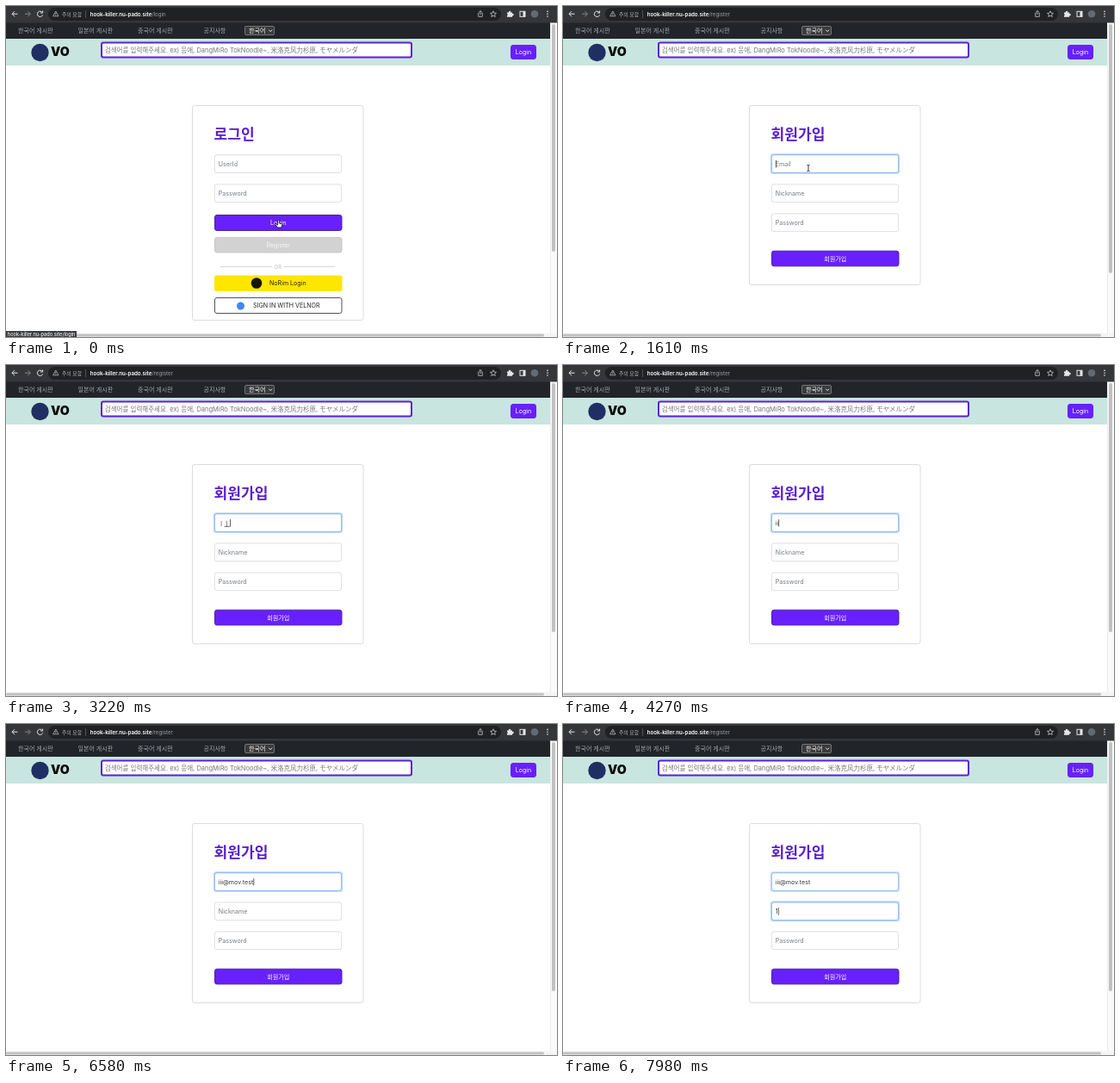
Animation of 640x384 px, one loop 8000 ms. Source, as an HTML page:

```html
<!DOCTYPE html>
<html lang="ko">
<head>
<meta charset="utf-8">
<title>회원가입</title>
<style>
  html, body { margin: 0; width: 100%; height: 100%; overflow: hidden; background: #fff; }
  svg { display: block; width: 640px; height: 384px; }
  text { font-family: Inter, "Noto Sans CJK KR", "Noto Sans CJK", "Noto Sans CJK JP", sans-serif; white-space: pre; }
</style>
</head>
<body>
<svg id="stage" viewBox="0 0 640 384" xmlns="http://www.w3.org/2000/svg"></svg>
<script>
const LOOP = 8000;
const PURPLE = '#6820ff', EDGE = '#4a21a8', MUTED = '#757b82';
const stage = document.getElementById('stage');

function add(parent, tag, attrs, content) {
  const el = document.createElementNS(stage.namespaceURI, tag);
  for (const k in attrs) el.setAttribute(k, attrs[k]);
  if (content !== undefined) el.textContent = content;
  parent.appendChild(el);
  return el;
}
const group = (parent = stage) => add(parent, 'g', {});
const rect = (p, x, y, width, height, fill, more) =>
  add(p, 'rect', { x, y, width, height, fill, ...more });
const circle = (p, cx, cy, r, fill) => add(p, 'circle', { cx, cy, r, fill });
const label = (p, x, y, str, size, fill, more) =>
  add(p, 'text', { x, y, 'font-size': size, fill, ...more }, str);
const line = (p, d, stroke, width = 1, more) =>
  add(p, 'path', { d, stroke, 'stroke-width': width, fill: 'none', ...more });
const show = (el, on) => el.setAttribute('visibility', on ? 'inherit' : 'hidden');
const MIDDLE = { 'text-anchor': 'middle' };

function button(p, x, y, w, h, str, fill, edge, color = '#fff') {
  rect(p, x + .5, y + .5, w - 1, h - 1, fill, { rx: 2.5, stroke: edge });
  label(p, x + w / 2, y + h / 2 + 2.6, str, 7.1, color, MIDDLE);
}

function field(p, y, hint) {
  const ring = group(p);
  rect(ring, 240.7, y - 1.3, 150.6, 24.1, '#c5dcfb', { rx: 3.6 });
  rect(p, 242.4, y + .4, 147.2, 20.7, '#fff', { rx: 2.5, stroke: '#d3d7dc', 'stroke-width': .8 });
  const focus = rect(p, 242.4, y + .4, 147.2, 20.7, 'none', { rx: 2.5, stroke: '#86b4f4', 'stroke-width': .9 });
  const text = label(p, 246.8, y + 13.6, '', 7.1, '#33383d');
  const under = rect(p, 0, y + 14.6, 6, .8, '#33383d');
  const caret = rect(p, 0, y + 6.6, .7, 8.6, '#222');
  return {
    set({ value = '', composing = false, glow = 0, caretOn = false }) {
      ring.setAttribute('opacity', glow);
      focus.setAttribute('opacity', glow);
      text.textContent = value || hint;
      text.setAttribute('fill', value ? '#33383d' : MUTED);
      const end = 246.8 + (value ? text.getComputedTextLength() : 0);
      caret.setAttribute('x', end + .2);
      under.setAttribute('x', end - 6.2);
      show(caret, caretOn);
      show(under, composing);
    }
  };
}

// Browser toolbar
rect(stage, 0, 0, 640, 20, '#35363a');
rect(stage, 49, 2, 526, 15, '#202124', { rx: 7.5 });
line(stage, 'M13.5 9.2H7.2M10 6.2 7 9.2 10 12.2', '#e4e6e9');
line(stage, 'M22 9.2H28.2M25.4 6.2 28.4 9.2 25.4 12.2', '#85888c');
line(stage, 'M42.3 7.6A3.2 3.2 0 1 0 42.6 10.4M42.6 5.6V8H40.1', '#e4e6e9');
line(stage, 'M57.8 6 61 11.8H54.6ZM57.8 8V9.8M57.8 10.3V11', '#b4b7bb', .8);
label(stage, 65, 11.5, '주의 요함', 5.8, '#b4b7bb');
rect(stage, 92, 5, .7, 9, '#65686c');
const url = label(stage, 97.8, 11.5, '', 6.2, '#9aa0a6');
add(url, 'tspan', { fill: '#fff', 'font-weight': 600 }, 'hook-killer.nu-pado.site');
const path = add(url, 'tspan', {}, '');
line(stage, 'M549.7 8H548.7V12.3H553.3V8H552.3M551 10V5.5M549.5 7 551 5.5 552.5 7', '#c4c7ca', .8);
line(stage, 'M566 5.8 567 8.2 569.5 8.4 567.6 10 568.2 12.5 566 11.2 563.8 12.5 564.4 10 562.5 8.4 565 8.2Z', '#c4c7ca', .8);
add(stage, 'path', { d: 'M582 7.4H584A1.2 1.2 0 1 1 586.2 7.4H588V9A1.2 1.2 0 1 1 588 11.2V12.8H582V11.2A1.2 1.2 0 0 0 582 9Z', fill: '#e4e6e9' });
rect(stage, 597, 6.3, 6, 6, 'none', { stroke: '#e4e6e9' });
rect(stage, 600.5, 6.3, 2.5, 6, '#e4e6e9');
circle(stage, 614, 9.3, 4.3, '#626a73');
for (const y of [6.4, 9.2, 12]) circle(stage, 629, y, .8, '#e4e6e9');

// Site header
rect(stage, 0, 19.5, 632, 18.5, '#212529');
[[14, '한국어 게시판'], [83.5, '일본어 게시판'], [153, '중국어 게시판'], [229.5, '공지사항']]
  .forEach(([x, s]) => label(stage, x, 31.3, s, 7, '#a3a7ab'));
rect(stage, 277.5, 23.5, 34, 10, '#3b3b3c', { rx: 1.5, stroke: '#86888a', 'stroke-width': .8 });
label(stage, 282, 31.2, '한국어', 7, '#fff');
line(stage, 'M305.3 27.7 307.2 29.6 309.1 27.7', '#fff', .9);
rect(stage, 0, 38, 632, 31, '#c9e5df');
circle(stage, 39.5, 54, 10.2, '#1f2f63');
label(stage, 52, 58.3, 'VO', 14.2, '#090909', { 'font-weight': 900 });
rect(stage, 111, 42.5, 360, 17, '#fff', { rx: 2, stroke: '#5a20d6', 'stroke-width': 2 });
label(stage, 114.8, 53.7, '검색어를 입력해주세요. ex) 응애, DangMiRo TokNoodle~, 米洛克风力杉原, モヤメルンダ', 7.5, '#777');
button(stage, 586, 45, 30, 17, 'Login', PURPLE, PURPLE);

// Scrollbars
rect(stage, 632, 19.5, 8, 364.5, '#fafafa');
rect(stage, 632, 19.5, .7, 364.5, '#e6e6e6');
const thumb = rect(stage, 634, 21, 4, 264, '#c1c1c1', { rx: 2 });
rect(stage, 0, 379.5, 640, 4.5, '#f4f4f4');
rect(stage, 0, 380.5, 625, 3, '#c1c1c1', { rx: 1.5 });

function card(height, title) {
  const g = group();
  rect(g, 216.5, 115.5, 198.5, height, '#fff', { rx: 2.5, stroke: '#dcdcdc' });
  label(g, 241.5, 155, title, 17.1, '#591fd0', { 'font-weight': 700 });
  return g;
}

// Login form
const login = card(249, '로그인');
field(login, 172.3, 'UserId').set({});
field(login, 206.5, 'Password').set({});
button(login, 242, 242, 148.5, 19, 'Login', PURPLE, EDGE);
button(login, 242, 268, 148.5, 18.5, 'Register', '#d2d2d2', '#c8c8c8', '#f6f6f6');
rect(login, 249, 302, 60, .8, '#d0d0d0');
rect(login, 322.5, 302, 60, .8, '#d0d0d0');
label(login, 315.8, 304.8, 'OR', 6, '#bdbdbd', MIDDLE);
rect(login, 242, 312.5, 148.5, 18.5, '#ffe600', { rx: 2.5 });
circle(login, 291, 321.5, 6.3, '#17150a');
label(login, 306, 324.2, 'NoRim Login', 7.1, '#29260c');
rect(login, 242.5, 338.5, 147.5, 18, '#fff', { rx: 2.5, stroke: '#3c4046', 'stroke-width': .9 });
circle(login, 272.5, 348, 4.5, '#4285f4');
label(login, 287, 349.6, 'SIGN IN WITH VELNOR', 7.1, '#212529');

// Sign-up form
const signup = card(208, '회원가입');
const email = field(signup, 172.3, 'Email');
const nick = field(signup, 206.5, 'Nickname');
field(signup, 240.5, 'Password').set({});
button(signup, 242, 283.7, 148.5, 18.6, '회원가입', PURPLE, EDGE);

// Link preview in the corner
const status = group();
const statusBox = rect(status, 0, 377, 82, 7, '#3a3b3f');
const statusText = label(status, 1.8, 382.6, '', 5.6, '#f1f1f1', { 'font-weight': 500 });

// Mouse pointers, drawn with the hot spot at 0,0
const mouse = group();
const pointers = {
  hand: add(mouse, 'path', {
    d: 'M-.9-3.2Q0-4.2.9-3.2V0L3.8.8Q4.6 1.1 4.4 2L3.6 5H-1.2L-3.4 1.8Q-3.2.6-2.2 1.1L-.9 2.2Z',
    fill: '#fff', stroke: '#111', 'stroke-width': .9
  }),
  arrow: add(mouse, 'path', {
    d: 'M0 0V6.2L1.4 5 2.4 7.2 3.5 6.7 2.5 4.6H4.3Z',
    fill: '#111', stroke: '#fff', 'stroke-width': .5
  }),
  beam: line(mouse, 'M-1.6-3.6Q0-3.6 0-2.6Q0-3.6 1.6-3.6M0-2.6V2.8M-1.6 3.8Q0 3.8 0 2.8Q0 3.8 1.6 3.8', '#222', .9)
};

// [time, x, y]
const route = [[70, 316.5, 252], [350, 312, 274], [600, 311.5, 273.5], [1120, 291, 192], [1260, 289, 191], [1400, 285, 188]];
// [time, email text]
const keys = [[0, ''], [2730, 'ㅣ'], [3150, 'ㅣㅣ'], [3570, 'ㅣㅣㅣ'], [3850, 'ㅣㅣ'], [3930, 'ㅣ'], [4010, '']];
const address = 'iii@mov.test';
[4130, 4270, 4400, 4830, 5040, 5250, 5600, 5880, 6020, 6160, 6300, 6440]
  .forEach((t, i) => keys.push([t, address.slice(0, i + 1)]));

const PAGE = 490, URL_SWAP = 700, FOCUS = 1120, TAB = 7490, DIGIT = 7910;
const clamp = v => Math.max(0, Math.min(1, v));
const fade = (t, from) => clamp((t - from) / 150);
const blink = age => age >= 0 && age % 1000 < 500;

function mouseAt(t) {
  const i = route.findIndex(p => p[0] > t);
  if (i === 0) return route[0].slice(1);
  if (i < 0) return route[route.length - 1].slice(1);
  const [a, b] = [route[i - 1], route[i]];
  const k = (t - a[0]) / (b[0] - a[0]), e = k * k * (3 - 2 * k);
  return [a[1] + (b[1] - a[1]) * e, a[2] + (b[2] - a[2]) * e];
}

function render(t) {
  const joined = t >= PAGE;
  show(login, !joined);
  show(signup, joined);
  path.textContent = t < URL_SWAP ? '/login' : '/register';
  thumb.setAttribute('height', joined ? 289 : 264);

  const onRegister = t >= 210;
  statusText.textContent = 'hook-killer.nu-pado.site' + (onRegister ? '/register' : '/login');
  statusBox.setAttribute('width', onRegister ? 89 : 82);
  status.setAttribute('opacity', 1 - fade(t, 800));

  const [x, y] = mouseAt(t);
  mouse.setAttribute('transform', `translate(${x} ${y})`);
  const kind = !joined ? 'hand' : y < 194 || (y > 206 && y < 228) || (y > 240 && y < 262) ? 'beam' : 'arrow';
  for (const k in pointers) show(pointers[k], k === kind && t < 2730);

  const [since, value] = keys.filter(k => k[0] <= t).pop();
  const tabbed = t >= TAB;
  email.set({
    value,
    composing: value.startsWith('ㅣ'),
    glow: fade(t, FOCUS) * (1 - .15 * fade(t, TAB)),
    caretOn: !tabbed && t >= FOCUS && blink(t - Math.max(since, Math.min(t, 1330)))
  });
  nick.set({
    value: t >= DIGIT ? '1' : '',
    glow: fade(t, TAB),
    caretOn: tabbed && (t >= DIGIT || blink(t - TAB))
  });
}

const start = performance.now();
function tick(now) {
  render(Math.max(0, now - start) % LOOP);
  requestAnimationFrame(tick);
}
render(0);
requestAnimationFrame(tick);
</script>
</body>
</html>
```
